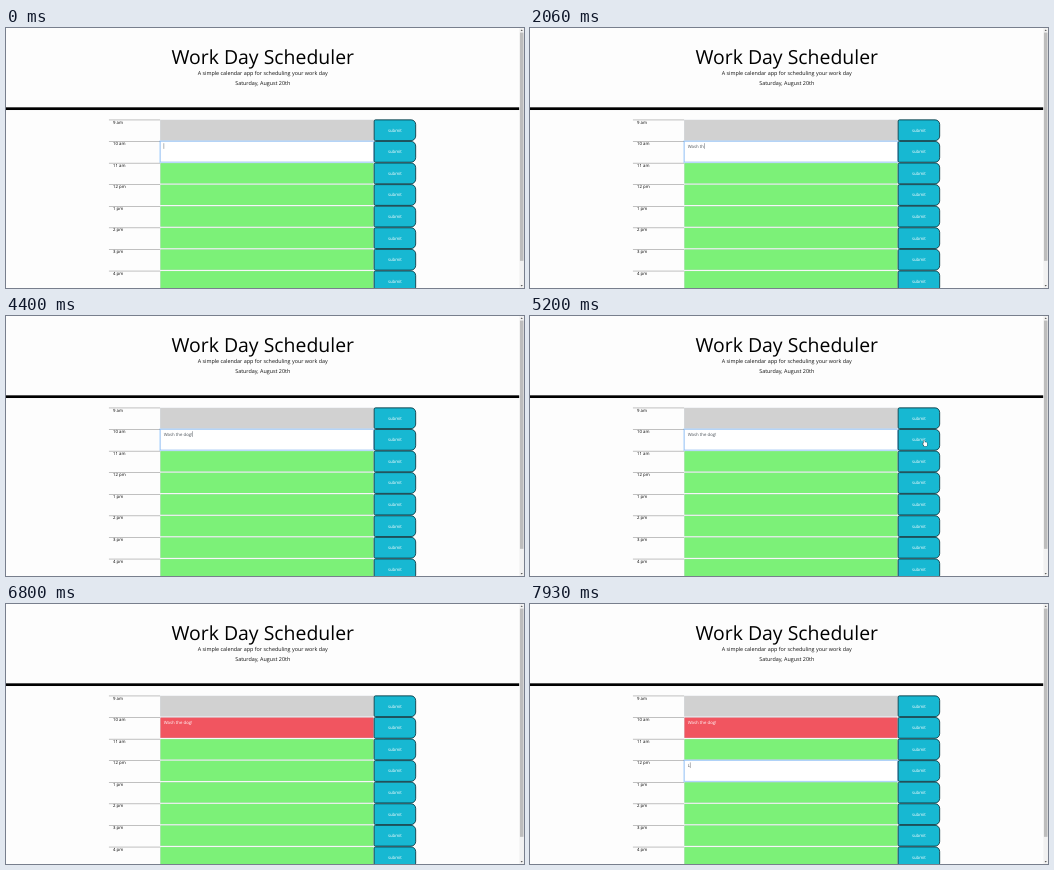
An HTML page with a canvas for the animation above (8 s loop, 518x260 px).

```html
<!DOCTYPE html>
<html lang="en">
<head>
<meta charset="utf-8">
<title>Work Day Scheduler</title>
<style>
  html, body { margin: 0; width: 100%; height: 100%; overflow: hidden; background: #fdfdfd; }
  canvas { display: block; width: 518px; height: 260px; }
</style>
</head>
<body>
<canvas id="stage"></canvas>
<script>
const W = 518, H = 260, LOOP = 8000;
const SCALE = W / 1920;            // layout is in pixels of a 1920 wide page
const PAGE_W = 1903, MID = PAGE_W / 2;
const LEFT = 381.5, FIELD = 571.5, BUTTON = 1363, RIGHT = 1520;
const ROW_TOP = 339, ROW_H = 80;
const HOURS = ['9 am', '10 am', '11 am', '12 pm', '1 pm', '2 pm', '3 pm', '4 pm'];
const BLINK = 530, FADE = 150;

const PAST = '#d1d1d1', PRESENT = '#f15560', FUTURE = '#7cf178';
const INK = '#495057';

const TASK = 'Wash the dog!';
const TASK_KEYS = [730, 1000, 1460, 1600, 1730, 1930, 2040, 2150, 2260, 2600, 2770, 2930, 3330];
const BLUR = 5470, FOCUS = 7000;
const NEXT = 'L', NEXT_KEYS = [7930];

// time, x, y of the fingertip while it is over a button
const HAND = [[4870, 1376, 470], [5200, 1461, 461], [5530, 1450, 472], [5860, 1450, 472], [6000, 1366, 500]];

const canvas = document.getElementById('stage');
const ctx = canvas.getContext('2d');
const dpr = window.devicePixelRatio || 1;
canvas.width = W * dpr;
canvas.height = H * dpr;

const clamp = v => Math.max(0, Math.min(1, v));
const ease = v => v * v * (3 - 2 * v);

function rect(x, y, w, h, color) {
  ctx.fillStyle = color;
  ctx.fillRect(x, y, w, h);
}

function text(str, x, y, size, color, align = 'left') {
  ctx.font = `${size}px "Open Sans", sans-serif`;
  ctx.textAlign = align;
  ctx.fillStyle = color;
  ctx.fillText(str, x, y);
}

function drawHeader() {
  text('Work Day Scheduler', MID, 134.5, 72, '#000', 'center');
  text('A simple calendar app for scheduling your work day', MID, 174, 20, '#111', 'center');
  text('Saturday, August 20th', MID, 211, 20, '#111', 'center');
  rect(0, 294, PAGE_W, 10, '#000');
}

function triangle(x, y, dy) {
  ctx.beginPath();
  ctx.moveTo(x - 4, y);
  ctx.lineTo(x + 4, y);
  ctx.lineTo(x, y + dy);
  ctx.fillStyle = '#555';
  ctx.fill();
}

function drawScrollbar() {
  const bottom = H / SCALE;
  rect(PAGE_W, 0, 17, bottom, '#f1f1f1');
  rect(PAGE_W + 2, 17, 13, 846, '#bdbdbd');
  triangle(PAGE_W + 8.5, 11, -5);
  triangle(PAGE_W + 8.5, bottom - 11, 5);
}

function drawButton(y) {
  ctx.beginPath();
  ctx.roundRect(BUTTON + 1.5, y + 1.5, RIGHT - BUTTON - 3, ROW_H - 3, [5, 17, 17, 5]);
  ctx.fillStyle = '#17b8d2';
  ctx.fill();
  ctx.lineWidth = 3;
  ctx.strokeStyle = '#062c34';
  ctx.stroke();
  text('submit', (BUTTON + RIGHT) / 2, y + 45.5, 16, '#fff', 'center');
}

function drawField(y, color) {
  rect(FIELD, y, BUTTON - FIELD, ROW_H, '#fff');
  rect(FIELD, y + 1, BUTTON - FIELD, 77, '#ced4da');
  rect(FIELD + 1, y + 2, BUTTON - FIELD - 2, 75, color);
}

function drawGlow(y, amount) {
  if (amount <= 0) return;
  const w = BUTTON - FIELD;
  ctx.globalAlpha = amount;
  ctx.lineWidth = 3.2;
  ctx.strokeStyle = 'rgba(0,123,255,.25)';
  ctx.strokeRect(FIELD - 1.6, y - 0.6, w + 3.2, 80.2);
  ctx.lineWidth = 1.5;
  ctx.strokeStyle = '#80bdff';
  ctx.strokeRect(FIELD + 0.5, y + 1.5, w - 1, 76);
  ctx.globalAlpha = 1;
}

// Text typed so far, with a caret that restarts its blink on every key
function drawEntry(y, str, keys, t, focused, start, color) {
  const count = keys.filter(k => k <= t).length;
  const shown = str.slice(0, count);
  const x = FIELD + 13, base = y + 24;
  text(shown, x, base, 16, color);
  if (!focused) return;
  const since = t - (count ? keys[count - 1] : start);
  if (Math.floor(since / BLINK) % 2 === 0) {
    rect(x + ctx.measureText(shown).width, base - 16, 1.6, 21, INK);
  }
}

function drawRows(t) {
  const firstFocus = t < BLUR, nextFocus = t >= FOCUS;
  const rowY = i => ROW_TOP + i * ROW_H;

  HOURS.forEach((hour, i) => {
    const y = rowY(i);
    const focused = (i === 1 && firstFocus) || (i === 3 && nextFocus);
    const color = focused ? '#fff' : i === 0 ? PAST : i === 1 ? PRESENT : FUTURE;
    rect(LEFT, y + 1, FIELD - LEFT, 1.7, '#777');
    text(hour, LEFT + 15, y + 15, 16, '#000');
    drawField(y, color);
  });

  drawGlow(rowY(1), 1 - ease(clamp((t - BLUR) / FADE)));
  drawGlow(rowY(3), ease(clamp((t - FOCUS) / FADE)));
  HOURS.forEach((_, i) => drawButton(rowY(i)));

  drawEntry(rowY(1), TASK, TASK_KEYS, t, firstFocus, -130, firstFocus ? INK : '#fff');
  if (nextFocus) drawEntry(rowY(3), NEXT, NEXT_KEYS, t, true, FOCUS, INK);
}

function drawHand(t) {
  const i = HAND.findIndex(p => p[0] > t);
  if (i < 1) return;
  const [t0, x0, y0] = HAND[i - 1], [t1, x1, y1] = HAND[i];
  const k = ease((t - t0) / (t1 - t0));
  ctx.save();
  ctx.translate(x0 + (x1 - x0) * k, y0 + (y1 - y0) * k);
  ctx.beginPath();
  ctx.roundRect(-2, 0, 4, 16, 2);
  ctx.roundRect(-2, 7, 13, 15, [2, 4, 4, 3]);
  ctx.moveTo(-2, 12);
  ctx.lineTo(-6, 11);
  ctx.lineTo(-1, 21);
  ctx.closePath();
  ctx.lineWidth = 2;
  ctx.strokeStyle = '#111';
  ctx.stroke();
  ctx.fillStyle = '#fff';
  ctx.fill();
  ctx.restore();
}

function draw(t) {
  ctx.setTransform(dpr, 0, 0, dpr, 0, 0);
  rect(0, 0, W, H, '#fdfdfd');
  ctx.scale(SCALE, SCALE);
  ctx.textRendering = 'geometricPrecision';
  drawHeader();
  drawRows(t);
  drawScrollbar();
  drawHand(t);
}

const begin = performance.now();
function tick() {
  draw((performance.now() - begin) % LOOP);
  requestAnimationFrame(tick);
}
tick();
</script>
</body>
</html>
```
